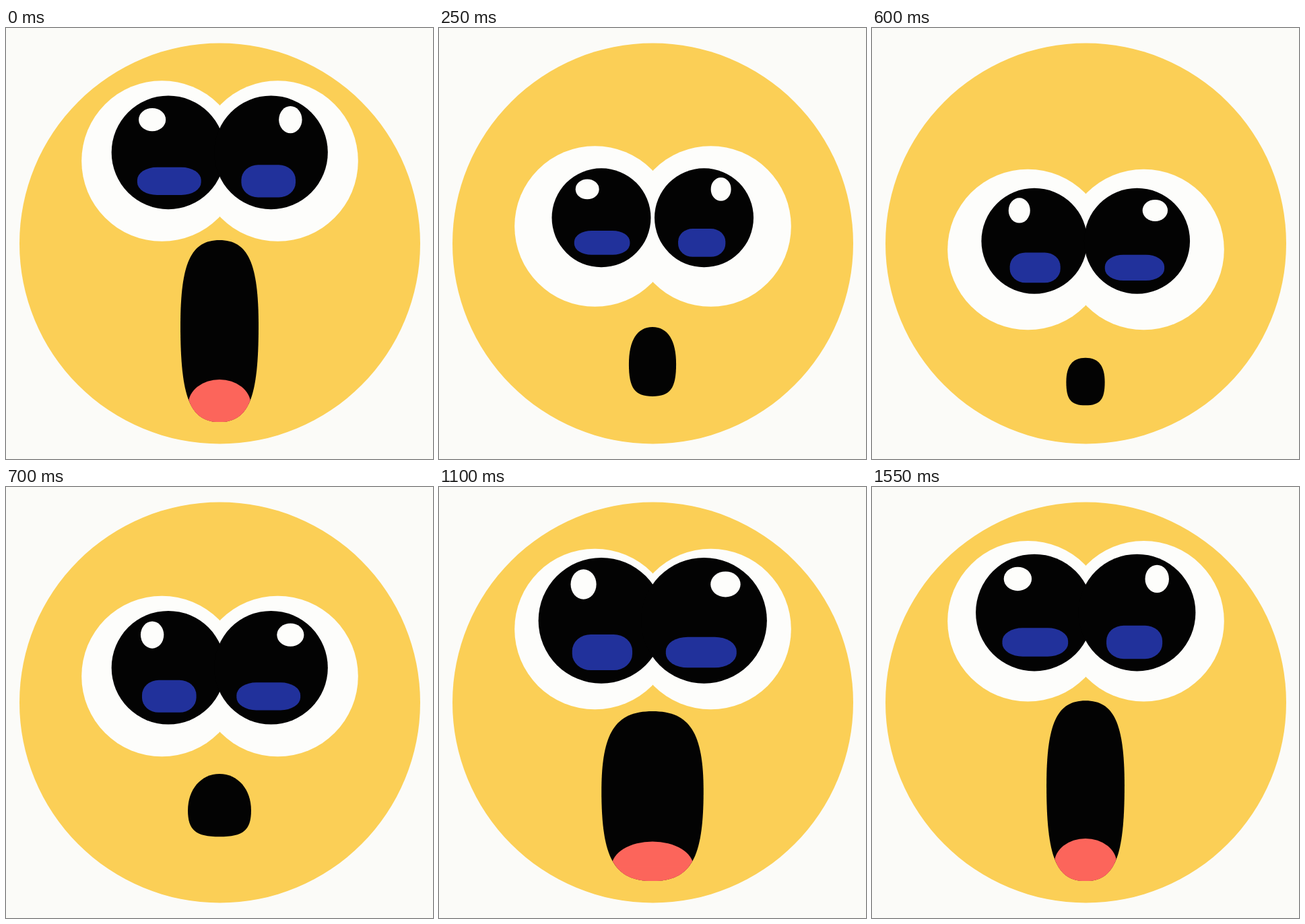
An HTML page with a canvas that plays this animation: 634 by 640 pixels, repeating every 1.6 s.

```html
<!DOCTYPE html>
<html lang="en">
<head>
<meta charset="utf-8">
<title>Surprised face</title>
<style>
  html, body { margin: 0; width: 100%; height: 100%; overflow: hidden; background: #fbfbf8; }
  canvas { display: block; }
</style>
</head>
<body>
<canvas id="stage" width="634" height="640"></canvas>
<script>
const ctx = document.getElementById('stage').getContext('2d');
const { PI, sin, cos, exp, min, max } = Math;
const LOOP = 1600, STEP = 50, CYCLE = 31, FALL = 10;
const BLACK = '#030303', WHITE = '#fdfdfb';

// The face sinks with a sine ease, then springs back exponentially.
function pose(step) {
  const rise = max(0, step - FALL);
  const falling = step < FALL;
  const sunk = falling ? sin(PI / 2 * step / FALL) : exp(-rise / 4.4);
  const lift = falling
    ? 42 * sin(PI * step / FALL) ** 2
    : 84 * sin(PI * min(1, rise / 10.5));
  const yawn = sin(PI * (rise / (CYCLE - FALL)) ** 0.8) ** 2;
  const swell = cos(2 * PI * (step - 6.5) / CYCLE);
  return {
    drop: 165 * sunk,
    pupil: 87.5 - 11.3 * swell - 5.4 * swell ** 2,
    half: 58 - 39 * sunk + 23 * yawn,
    lift
  };
}

function ellipse(color, x, y, rx, ry = rx) {
  ctx.fillStyle = color;
  ctx.beginPath();
  ctx.ellipse(x, y, rx, ry, 0, 0, 2 * PI);
  ctx.fill();
}

function pupil(x, y, r, glintX, blueX, wide) {
  const [gx, gy] = wide ? [0.238, 0.204] : [0.204, 0.238];
  const [bx, by] = wide ? [0.562 * r, 0.244 * r] : [0.478 * r, 0.285 * r];
  ellipse(BLACK, x, y, r);
  ellipse(WHITE, x + glintX * r, y - 0.577 * r, gx * r, gy * r);
  ctx.fillStyle = '#21319b';
  ctx.beginPath();
  ctx.roundRect(x + blueX * r - bx, y + 0.505 * r - by, 2 * bx, 2 * by,
    { x: bx * 0.62, y: by * 0.92 });
  ctx.fill();
}

function mouth({ drop, half: w, lift }) {
  const x = 317, top = 315 + 1.33 * drop, bottom = 585 - lift;
  const height = bottom - top;
  const mid = top + height * (0.47 + 0.0017 * lift);
  const path = new Path2D();
  const arch = (from, end, k) => {
    const to = 2 * x - from, y = mid + (end - mid) * k;
    const inset = (from - x) * k;
    path.bezierCurveTo(from, y, x + inset, end, x, end);
    path.bezierCurveTo(x - inset, end, to, y, to, mid);
  };
  path.moveTo(x - w, mid);
  arch(x - w, top, 0.73 - 0.0023 * lift);
  arch(x + w, bottom, 0.75);
  ctx.fillStyle = BLACK;
  ctx.fill(path);

  // The tongue shows only when the mouth is open wide enough.
  const tongue = min(63, (height - 135) / 2);
  if (tongue <= 0) return;
  const rx = 0.8 * w, ry = 37, y = bottom - tongue + ry;
  ctx.save();
  ctx.clip(path);
  ellipse('#fc655b', x, y, rx, ry);
  ctx.fillRect(x - rx, y, 2 * rx, 80);
  ctx.restore();
}

function draw(now) {
  const t = now % LOOP;
  const p = pose(max(0, Math.floor(t / STEP) - 1));
  const swapped = t >= LOOP / 4 && t < LOOP * 3 / 4;
  const eyeY = 197.5 + p.drop;

  ctx.fillStyle = '#fbfbf8';
  ctx.fillRect(0, 0, 634, 640);
  ellipse('#fbcf56', 317.5, 320, 297.5);
  ellipse(WHITE, 231.5, eyeY, 119.3);
  ellipse(WHITE, 403.5, eyeY, 119.3);
  pupil(241, eyeY - 12.7, p.pupil, -0.283, 0.015, !swapped);
  pupil(393.5, eyeY - 12.7, p.pupil, 0.342, -0.045, swapped);
  mouth(p);
  requestAnimationFrame(draw);
}
requestAnimationFrame(draw);
</script>
</body>
</html>
```
